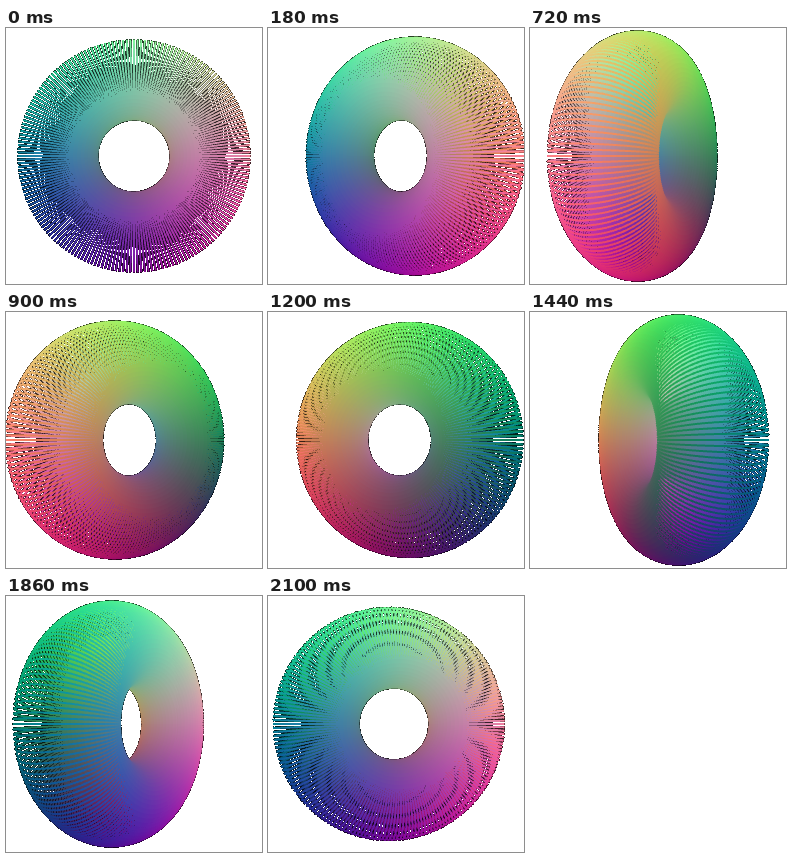
Write an HTML page with a canvas that moves like this. It is 256 px wide and 256 px high and loops after 2.16 s.

```html
<!DOCTYPE html>
<html lang="en">
<head>
<meta charset="utf-8">
<title>Turning torus</title>
<style>
  html, body { margin: 0; width: 100%; height: 100%; overflow: hidden; background: #fff; }
  canvas { display: block; width: 256px; height: 256px; }
</style>
</head>
<body>
<canvas id="stage" width="256" height="256"></canvas>
<script>
const SIZE = 256, STEPS = 36, STEP_MS = 60;
const RINGS = 200, SIDES = 64;
const MAJOR = 2, MINOR = 1, REACH = MAJOR + MINOR;
const CAMERA = REACH / Math.sin(Math.PI / 6);
const FOCAL = SIZE / 2 / Math.tan(Math.PI / 6);
const HALF_LINE = 1;
// Four sample points per pixel
const SAMPLES = [[0.375, 0.125], [0.875, 0.375], [0.125, 0.625], [0.625, 0.875]];

const ctx = document.getElementById('stage').getContext('2d');
const depth = new Float32Array(SIZE * SIZE * 4);
const tint = new Uint32Array(SIZE * SIZE * 4);
const cache = [];

const clampPixel = v => Math.min(SIZE - 1, Math.max(0, Math.floor(v)));
const channel = v => Math.round(255 * Math.min(1, Math.max(0, 0.5 + v / (2 * REACH))));

function project(u, v, cos, sin) {
  const radius = MAJOR + MINOR * Math.cos(v);
  const x = radius * Math.cos(u), y = radius * Math.sin(u), z = MINOR * Math.sin(v);
  const near = 1 / (CAMERA - (x * sin + z * cos));
  return {
    x: SIZE / 2 + (x * cos - z * sin) * FOCAL * near,
    y: SIZE / 2 - y * FOCAL * near,
    near,
    color: channel(x) | channel(y) << 8 | channel(z) << 16
  };
}

// A line with square caps, tested against the depth of each sample
function drawLine(a, b) {
  const dx = b.x - a.x, dy = b.y - a.y;
  const len = Math.hypot(dx, dy) || 1e-6;
  const ux = dx / len, uy = dy / len;
  const pad = HALF_LINE * Math.SQRT2;
  const left = clampPixel(Math.min(a.x, b.x) - pad);
  const right = clampPixel(Math.max(a.x, b.x) + pad);
  const top = clampPixel(Math.min(a.y, b.y) - pad);
  const bottom = clampPixel(Math.max(a.y, b.y) + pad);
  for (let py = top; py <= bottom; py++) {
    for (let px = left; px <= right; px++) {
      for (let s = 0; s < 4; s++) {
        const rx = px + SAMPLES[s][0] - a.x, ry = py + SAMPLES[s][1] - a.y;
        const along = rx * ux + ry * uy;
        if (along < -HALF_LINE || along > len + HALF_LINE) continue;
        if (Math.abs(rx * uy - ry * ux) > HALF_LINE) continue;
        const part = Math.min(1, Math.max(0, along / len));
        const near = a.near + (b.near - a.near) * part;
        const i = (py * SIZE + px) * 4 + s;
        if (near > depth[i]) {
          depth[i] = near;
          tint[i] = a.color;
        }
      }
    }
  }
}

// Partly covered pixels darken; untouched ones stay white
function resolve() {
  const image = ctx.createImageData(SIZE, SIZE);
  const out = image.data;
  for (let p = 0; p < out.length; p += 4) {
    let r = 0, g = 0, b = 0, hits = 0;
    for (let i = p; i < p + 4; i++) {
      if (!depth[i]) continue;
      hits++;
      r += tint[i] & 255;
      g += tint[i] >> 8 & 255;
      b += tint[i] >> 16;
    }
    out[p] = hits ? r / 4 : 255;
    out[p + 1] = hits ? g / 4 : 255;
    out[p + 2] = hits ? b / 4 : 255;
    out[p + 3] = 255;
  }
  return image;
}

function render(step) {
  const angle = step / STEPS * 2 * Math.PI;
  const cos = Math.cos(angle), sin = Math.sin(angle);
  depth.fill(0);
  tint.fill(0);
  for (let ring = 0; ring < RINGS; ring++) {
    const u = ring / RINGS * 2 * Math.PI;
    let last = project(u, 0, cos, sin);
    for (let side = 1; side <= SIDES; side++) {
      const next = project(u, side / SIDES * 2 * Math.PI, cos, sin);
      drawLine(last, next);
      last = next;
    }
  }
  return resolve();
}

let shown = -1;
function tick() {
  const step = Math.floor(performance.now() / STEP_MS) % STEPS;
  if (step !== shown) {
    cache[step] = cache[step] || render(step);
    ctx.putImageData(cache[step], 0, 0);
    shown = step;
  }
  requestAnimationFrame(tick);
}
tick();
</script>
</body>
</html>
```
